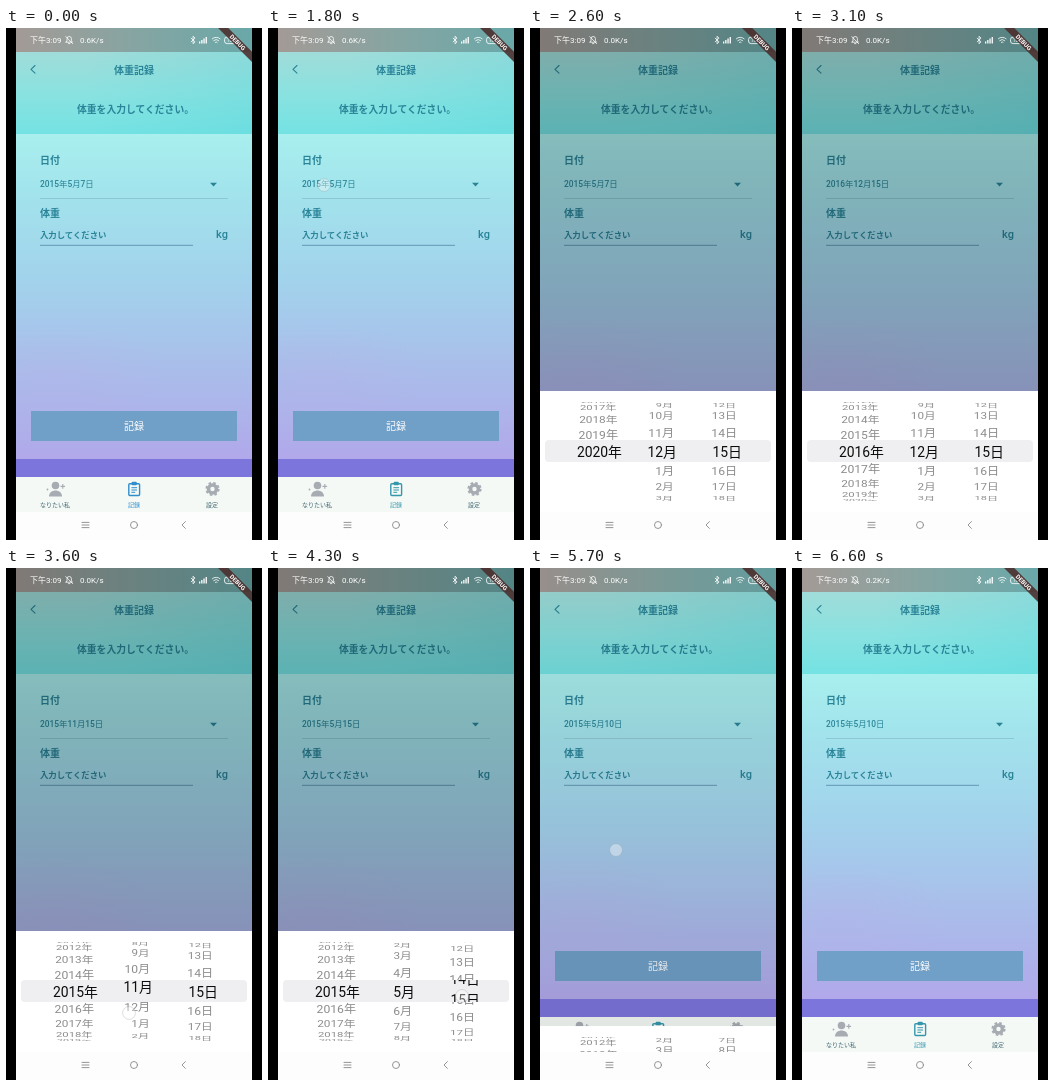
An HTML page for the animation above (7500 ms loop, 256x512 px).

```html
<!DOCTYPE html>
<html lang="ja">
<head>
<meta charset="utf-8">
<title>体重記録</title>
<style>
  html, body { margin: 0; height: 100%; overflow: hidden; background: #000; }
  svg { display: block; width: 100vw; height: 100vh; }
  text { font-family: Roboto, "Noto Sans CJK JP", "Noto Sans CJK", sans-serif; white-space: pre; }
  .b { font-weight: 700; }
  .m { font-weight: 500; }
  .mid { text-anchor: middle; }
  .end { text-anchor: end; }
  .ink { fill: #2a8498; }
  .line { fill: none; stroke-linecap: round; stroke-linejoin: round; }
</style>
</head>
<body>
<svg viewBox="0 0 256 512" xmlns="http://www.w3.org/2000/svg">
  <defs>
    <linearGradient id="page" x1="0" y1="0" x2="0" y2="1">
      <stop offset="0" stop-color="#a9efee"/>
      <stop offset=".17" stop-color="#a2e4ec"/>
      <stop offset=".44" stop-color="#a2d3ec"/>
      <stop offset=".7" stop-color="#a9bfea"/>
      <stop offset="1" stop-color="#b1a8ea"/>
    </linearGradient>
    <linearGradient id="head" x1="0" y1="0" x2="0" y2="1">
      <stop offset="0" stop-color="#a0dcd9"/>
      <stop offset=".5" stop-color="#8ae2e0"/>
      <stop offset="1" stop-color="#74e2e3"/>
    </linearGradient>
    <linearGradient id="status">
      <stop offset="0" stop-color="#a39a96"/>
      <stop offset=".5" stop-color="#86a5a2"/>
      <stop offset="1" stop-color="#6aa8a9"/>
    </linearGradient>
    <linearGradient id="tint">
      <stop offset=".3" stop-color="#52d2da" stop-opacity="0"/>
      <stop offset="1" stop-color="#52d2da" stop-opacity=".25"/>
    </linearGradient>
    <radialGradient id="haze">
      <stop offset="0" stop-color="#b8aee8" stop-opacity=".25"/>
      <stop offset="1" stop-color="#b8aee8" stop-opacity="0"/>
    </radialGradient>
    <clipPath id="screen"><rect x="10" width="236" height="512"/></clipPath>
    <clipPath id="wheelArea"><rect x="10" y="374" width="236" height="99"/></clipPath>
    <clipPath id="bandArea"><rect x="15" y="412" width="226" height="22"/></clipPath>
  </defs>

  <rect width="256" height="512"/>
  <g clip-path="url(#screen)">
    <!-- page -->
    <rect x="10" y="106" width="236" height="326" fill="url(#page)"/>
    <ellipse cx="50" cy="350" rx="110" ry="60" fill="url(#haze)"/>
    <rect x="10" y="24" width="236" height="82" fill="url(#head)"/>
    <rect x="10" y="24" width="236" height="82" fill="url(#tint)"/>
    <rect x="10" width="236" height="24" fill="url(#status)"/>
    <rect x="10" y="431" width="236" height="18" fill="#7c75dc"/>

    <path class="line" d="M29 37.5l-4 3.8 4 3.8" stroke="#2a8498" stroke-width="1.1"/>
    <g class="ink">
      <text class="b mid" x="128" y="45.7" font-size="10">体重記録</text>
      <text class="b" x="71" y="84.7" font-size="9.8">体重を入力してください。</text>
      <text class="b" x="34" y="136.2" font-size="10">日付</text>
      <text class="m" x="34" y="159.4" font-size="8.4" id="date"></text>
      <path d="M204 154.8h7l-3.5 3.6z"/>
      <text class="b" x="34" y="189.2" font-size="10">体重</text>
      <text class="b" x="34" y="209.5" font-size="8.4">入力してください</text>
      <text class="m" x="210" y="209.5" font-size="11">kg</text>
    </g>
    <path d="M34 170.5h188" stroke="#84bccb" stroke-width=".7"/>
    <path d="M34 217.3h153" stroke="#5d8fac" stroke-width=".9"/>
    <rect x="25" y="383" width="206" height="30" fill="#709fc7"/>
    <text class="m mid" x="128" y="401.6" font-size="10" fill="#fff">記録</text>

    <!-- tabs -->
    <rect x="10" y="449" width="236" height="35" fill="#f5f9f6"/>
    <g fill="#a7abb2">
      <circle cx="49.5" cy="457.5" r="3.8"/>
      <path d="M43 468.5c0-8 13-8 13 0z"/>
      <circle cx="41.5" cy="461.5" r=".9"/>
      <path d="M54.5 458.4h4.6M56.8 456.1v4.6" stroke="#a7abb2" stroke-width="1.1"/>
      <circle cx="206.5" cy="461" r="4" fill="none" stroke="#a7abb2" stroke-width="3.6"/>
      <circle cx="206.5" cy="461" r="6.2" fill="none" stroke="#a7abb2" stroke-width="1.8" stroke-dasharray="2.6 2.27"/>
    </g>
    <g id="tab">
      <rect x="122.8" y="455.7" width="10.8" height="11.8" rx="1" fill="none" stroke="currentColor" stroke-width="1.4"/>
      <rect x="125.6" y="453.8" width="5.2" height="3.4" rx="1" fill="currentColor"/>
      <path d="M125.4 459.7h5.6M125.4 462h5.6M125.4 464.3h3.8" stroke="currentColor"/>
      <text class="mid" x="128" y="479" font-size="6" fill="currentColor">記録</text>
    </g>
    <g class="mid" font-size="6" fill="#3f6670">
      <text x="49" y="479">なりたい私</text>
      <text x="206" y="479">設定</text>
    </g>

    <rect id="scrim" x="10" width="236" height="512"/>

    <!-- date picker -->
    <g id="sheet">
      <rect x="10" y="363" width="236" height="149" fill="#fff"/>
      <g id="outer" clip-path="url(#wheelArea)" fill="#8c8c8c" font-size="12.3" class="end"></g>
      <rect x="15" y="412" width="226" height="22" rx="4" fill="#efeff1"/>
      <g id="band" clip-path="url(#bandArea)" fill="#0c0c0c" font-size="13.9" class="end"></g>
    </g>

    <!-- system bars -->
    <rect x="10" y="484" width="236" height="28" fill="#fdfdfd"/>
    <g class="line" stroke="#8b8b8b" stroke-width=".9">
      <path d="M76 494.4h7M76 497h7M76 499.6h7M179.4 493.6l-3.4 3.4 3.4 3.4"/>
      <circle cx="128" cy="497" r="3.5"/>
    </g>
    <g fill="#fff" font-size="8">
      <text x="24" y="15.2">下午3:09</text>
      <text x="74" y="15.2" id="speed"></text>
      <text class="mid" x="225" y="14.3" font-size="5.4">100</text>
      <path d="M193 15.5v-2h1.3v2zM195.2 15.5v-3.4h1.3v3.4zM197.4 15.5v-4.9h1.3v4.9zM199.6 15.5v-6.4h1.3v6.4z"/>
    </g>
    <g class="line" stroke="#fff" stroke-width=".8">
      <path d="M60 14.2h6.4l-1-1.3v-2.2a2.2 2.2 0 0 0-4.4 0v2.2zM62.5 15.6h1.4M59.8 8.6l6.8 7"/>
      <path d="M185.2 10.2l3.8 3.7-1.9 1.9V8.2l1.9 1.9-3.8 3.7"/>
      <path d="M206.3 10.8a5.6 5.6 0 0 1 7.8 0M207.7 12.6a3.6 3.6 0 0 1 5 0M209.3 14.3a1.3 1.3 0 0 1 1.8 0"/>
      <rect x="218.5" y="9" width="13" height="6.6" rx="2.6"/>
    </g>
    <g transform="translate(246 0) rotate(45)">
      <rect x="-26" y="16.8" width="52" height="7.2" fill="#4a2d2c" fill-opacity=".88"/>
      <text class="b mid" y="22.6" font-size="6.1" fill="#fff">DEBUG</text>
    </g>
    <circle id="touch" r="6.4" fill="#fff" fill-opacity=".38" stroke="#8f9aa0" stroke-opacity=".4" stroke-width=".8"/>
  </g>
</svg>
<script>
const LOOP = 7500, STEP = 100, CENTER = 423.5, RADIUS = 51;
const $ = id => document.getElementById(id);
const wrap = (n, size) => ((n - 1) % size + size) % size + 1;

// axis: x the rows shrink towards; right: edge of plain rows; big: edge of the chosen row
const wheels = [
  { unit: '年', angle: .34, axis: 68, right: 88.3, big: 92, max: 2020,
    path: [[2600, 2020], [2700, 2019.7], [2900, 2018], [3100, 2016], [3200, 2015.3], [3300, 2015]] },
  { unit: '月', angle: .382, axis: 131, right: 144.3, big: 147, size: 12,
    path: [[3400, 12], [3500, 11.7], [3600, 11.2], [3800, 9], [4000, 6.1], [4100, 5.2], [4200, 5]] },
  { unit: '日', angle: .382, axis: 194, right: 207.3, big: 212, size: 31,
    path: [[4200, 15], [4400, 14.2], [4600, 12.3], [4800, 10.7], [4900, 10.25], [5000, 10.07], [5200, 10]] }
];
const sheetPath = [[1800, 0], [1900, .45], [2000, .9], [2100, 1], [5500, 1], [5600, .8], [5700, .362], [5800, .07], [5900, 0]];
// from, to, x, first y, last y
const touches = [
  [1700, 1900, 56, 157, 157],
  [2700, 2900, 72, 427, 458],
  [3400, 3800, 123, 430, 460],
  [4300, 4600, 194, 428, 460],
  [5500, 5800, 86, 282, 282]
];

function along(path, t) {
  if (t <= path[0][0]) return path[0][1];
  for (let i = 1; i < path.length; i++) {
    const [t0, a] = path[i - 1], [t1, b] = path[i];
    if (t < t1) return a + (b - a) * (t - t0) / (t1 - t0);
  }
  return path[path.length - 1][1];
}

function makeRows(parent, count) {
  return Array.from({ length: count }, () =>
    parent.appendChild(document.createElementNS('http://www.w3.org/2000/svg', 'text')));
}
for (const w of wheels) {
  w.rows = makeRows($('outer'), 11);
  w.bigRows = makeRows($('band'), 3);
}

const label = (w, n) => n > w.max ? '' : (w.size ? wrap(n, w.size) : n) + w.unit;

function drawWheel(w, pos) {
  const near = Math.round(pos);
  w.rows.forEach((row, i) => {
    const n = near + i - 5, a = (n - pos) * w.angle, c = Math.cos(a);
    const shown = Math.abs(a) < 1.55;
    row.setAttribute('display', shown ? 'inline' : 'none');
    if (!shown) return;
    row.textContent = label(w, n);
    row.setAttribute('x', w.right - w.axis);
    row.setAttribute('y', 4.4);
    row.setAttribute('transform',
      `translate(${w.axis} ${CENTER + RADIUS * Math.sin(a)}) scale(${1 - .17 * (1 - c)} ${c})`);
  });
  w.bigRows.forEach((row, i) => {
    const n = near + i - 1;
    row.textContent = label(w, n);
    row.setAttribute('x', w.big);
    row.setAttribute('y', CENTER + 5.1 + 1.12 * RADIUS * Math.sin((n - pos) * w.angle));
  });
}

function draw(t) {
  const spots = wheels.map(w => along(w.path, t));
  wheels.forEach((w, i) => drawWheel(w, spots[i]));
  $('date').textContent = t <= 2700 ? '2015年5月7日'
    : wheels.map((w, i) => label(w, Math.round(spots[i]))).join('');

  const open = along(sheetPath, t);
  $('sheet').setAttribute('transform', `translate(0 ${149 * (1 - open)})`);
  $('scrim').setAttribute('opacity', .21 * open);

  $('speed').textContent = (t < 2100 ? '0.6' : t < 6500 ? '0.0' : '0.2') + 'K/s';
  $('tab').setAttribute('color', t < 800 ? '#2f8ecb' : '#3597ac');

  const hit = touches.find(([a, b]) => t >= a && t < b);
  $('touch').setAttribute('display', hit ? 'inline' : 'none');
  if (hit) {
    const [a, b, x, y0, y1] = hit;
    $('touch').setAttribute('cx', x);
    $('touch').setAttribute('cy', y0 + (y1 - y0) * (t - a) / (b - a));
  }
}

const start = performance.now();
function tick() {
  const t = (performance.now() - start) % LOOP;
  draw(Math.floor(t / STEP) * STEP);
  requestAnimationFrame(tick);
}
tick();
</script>
</body>
</html>
```
